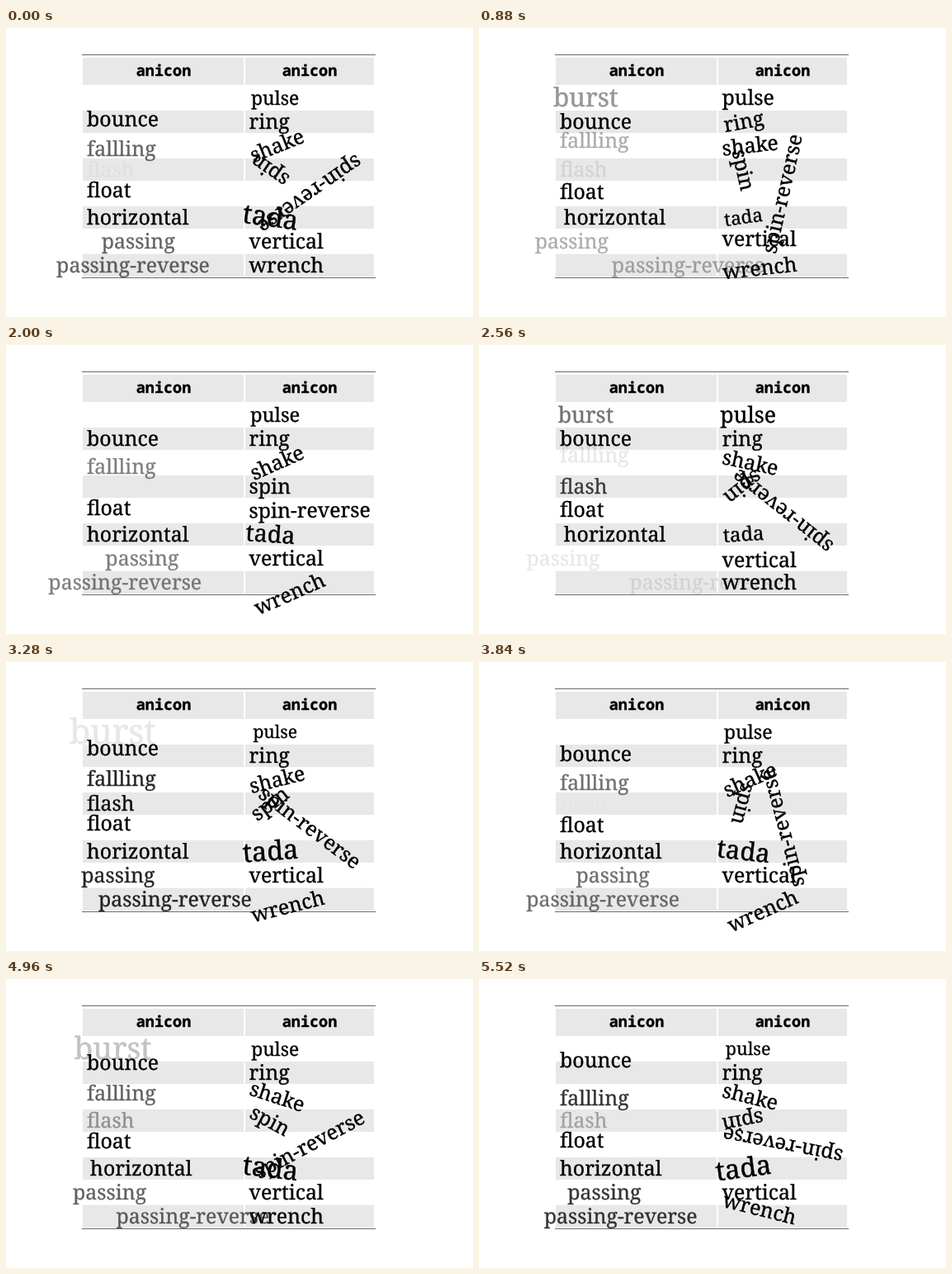
An HTML page for the animation above (5600 ms loop, 566 by 350 pixels).

```html
<!DOCTYPE html>
<html lang="en">
<head>
<meta charset="utf-8">
<title>anicon</title>
<style>
  html, body { margin: 0; width: 100%; height: 100%; overflow: hidden; background: #fff; }
  svg { display: block; width: 566px; height: 350px; }
  text { stroke: #000; stroke-width: 0.35px; stroke-linejoin: round; text-rendering: geometricPrecision; }
  .cell { fill: #e8e8e8; }
  .rule { stroke: #686868; stroke-width: 1; }
  .head { font: bold 18.5px "Noto Sans Mono", monospace; text-anchor: middle; }
  .word { font: 24.88px "Noto Serif", serif; }
</style>
</head>
<body>
<svg id="stage" viewBox="0 0 566 350"></svg>
<script>
const LOOP = 5600, STEP = 80;
const START = 29.397, TICK = 0.0842; // seconds into the CSS clocks, and per picture
const svg = document.getElementById('stage');

function add(tag, attrs, text) {
  const el = document.createElementNS('http://www.w3.org/2000/svg', tag);
  for (const k in attrs) el.setAttribute(k, attrs[k]);
  if (text) el.textContent = text;
  return svg.appendChild(el);
}

const bez = (a, b, u) => 3 * a * u * (1 - u) ** 2 + 3 * b * u * u * (1 - u) + u ** 3;
const linear = x => x;

// CSS "ease": cubic-bezier(.25, .1, .25, 1)
function ease(x) {
  let lo = 0, hi = 1;
  for (let i = 0; i < 24; i++) {
    const mid = (lo + hi) / 2;
    if (bez(0.25, 0.25, mid) < x) lo = mid; else hi = mid;
  }
  return bez(0.1, 1, lo);
}

// keys: [percent, value] pairs
function track(p, keys, curve) {
  const x = p * 100;
  for (let i = 1; i < keys.length; i++) {
    const [a, va] = keys[i - 1], [b, vb] = keys[i];
    if (x <= b) return va + (vb - va) * curve((x - a) / (b - a));
  }
  return keys[keys.length - 1][1];
}

// alternates +24 / -24 degrees with short holds
function swing(turns) {
  const keys = [[0, -12], [8, 12]];
  for (let i = 0; i < turns; i++) {
    const v = i % 2 ? -24 : 24;
    keys.push([10 + 10 * i, v], [18 + 10 * i, -v]);
  }
  return keys;
}

const WRENCH = [...swing(6), [75, 0], [100, 0]];
const SHAKE = [...swing(9), [100, -12]];
const RING = [15, 15, 18, 18, 22, 22, 18, 18, 12, 12]
  .map((v, i) => [2 * i, i % 2 ? v : -v]).concat([[20, 0], [100, 0]]);
const SHIVER = [0, 1, 2, 3, 4, 5].map(i => [4 * i, i % 2 ? 3 : -3])
  .concat([[22, 0], [100, 0]]);
const SLIDE = [0, 1, 2, 3, 4, 5, 6].map(i => [6 * i, i % 2 ? 5 : 0]).concat([[100, 0]]);
const BOUNCE = [[0, 0], [20, 0], [40, -15], [50, 0], [60, -15], [80, 0], [100, 0]];
const FLASH = [[0, 1], [25, 0], [50, 1], [75, 0], [100, 1]];
const FADE = [[0, 0], [50, 1], [100, 0]];
const PULSE = [[0, 1.1], [50, 0.8], [100, 1.1]];
const TADA_SIZE = [[0, 1], [10, 0.9], [20, 0.9], [30, 1.3], [70, 1.3], [80, 1], [100, 1]];
const TADA_TURN = [[0, 0], [10, -8], [20, -8], [30, 8], [40, -8], [50, 8],
  [60, -8], [70, 8], [80, 0], [100, 0]];

const fade = p => track(p, FADE, linear);

// each rule: phase and width in, pose out
const rules = {
  burst: p => p < 0.5 ? { scale: 1 + 1.6 * p, alpha: 0.6 - 1.2 * p } : { alpha: 0 },
  pulse: p => ({ scale: track(p, PULSE, linear) }),
  bounce: p => ({ y: track(p, BOUNCE, ease) }),
  ring: p => ({ turn: track(p, RING, ease) }),
  fallling: p => ({ y: 19 * (p - 0.5), alpha: fade(p) }),
  shake: p => ({ turn: track(p, SHAKE, ease) }),
  flash: p => ({ alpha: track(p, FLASH, ease) }),
  spin: p => ({ turn: 359 * p }),
  float: p => ({ y: -6 * fade(p) }),
  'spin-reverse': p => ({ turn: -359 * p }),
  horizontal: p => ({ x: track(p, SLIDE, ease) }),
  tada: p => ({ scale: track(p, TADA_SIZE, linear), turn: track(p, TADA_TURN, linear) }),
  passing: (p, w) => ({ x: w * (p - 0.5), alpha: fade(p) }),
  vertical: p => ({ y: track(p, SHIVER, ease) }),
  'passing-reverse': (p, w) => ({ x: w * (0.5 - p), alpha: fade(p) }),
  wrench: p => ({ turn: track(p, WRENCH, ease) })
};
const periods = { spin: 1.5, 'spin-reverse': 1.5, shake: 2.5, wrench: 2.5 };

// pivot: share of the width, and height above the baseline
const pivots = { ring: [0.5, 18], wrench: [0.9, 11] };

function band(y, h) {
  add('rect', { class: 'cell', x: 93, y, width: 195, height: h });
  add('rect', { class: 'cell', x: 290, y, width: 156, height: h });
}

band(36, 33);
for (let i = 0; i < 4; i++) band(100 + 57.9 * i, 27.2);
for (const y of [32.5, 302.5]) add('line', { class: 'rule', x1: 92, x2: 448, y1: y, y2: y });
for (const x of [191, 368]) add('text', { class: 'head', x, y: 58.3 }, 'anicon');

const words = Object.keys(rules).map((name, i) => {
  const x = i % 2 ? 294.5 : 98;
  const y = 93.3 + 28.9 * Math.floor(i / 2);
  const el = add('text', { class: 'word', x, y }, name);
  const width = el.getComputedTextLength();
  const [share, rise] = pivots[name] || [0.5, 8];
  return { el, width, rule: rules[name], period: periods[name] || 2,
    cx: x + width * share, cy: y - rise };
});

function draw(ms) {
  const t = START + TICK * Math.floor((ms % LOOP) / STEP);
  for (const w of words) {
    const { x = 0, y = 0, turn = 0, scale = 1, alpha = 1 } =
      w.rule((t / w.period) % 1, w.width);
    w.el.setAttribute('transform', `translate(${w.cx + x} ${w.cy + y}) ` +
      `rotate(${turn}) scale(${scale}) translate(${-w.cx} ${-w.cy})`);
    w.el.setAttribute('opacity', alpha);
  }
}

function frame() {
  draw(performance.now());
  requestAnimationFrame(frame);
}
draw(0);
requestAnimationFrame(frame);
</script>
</body>
</html>
```
